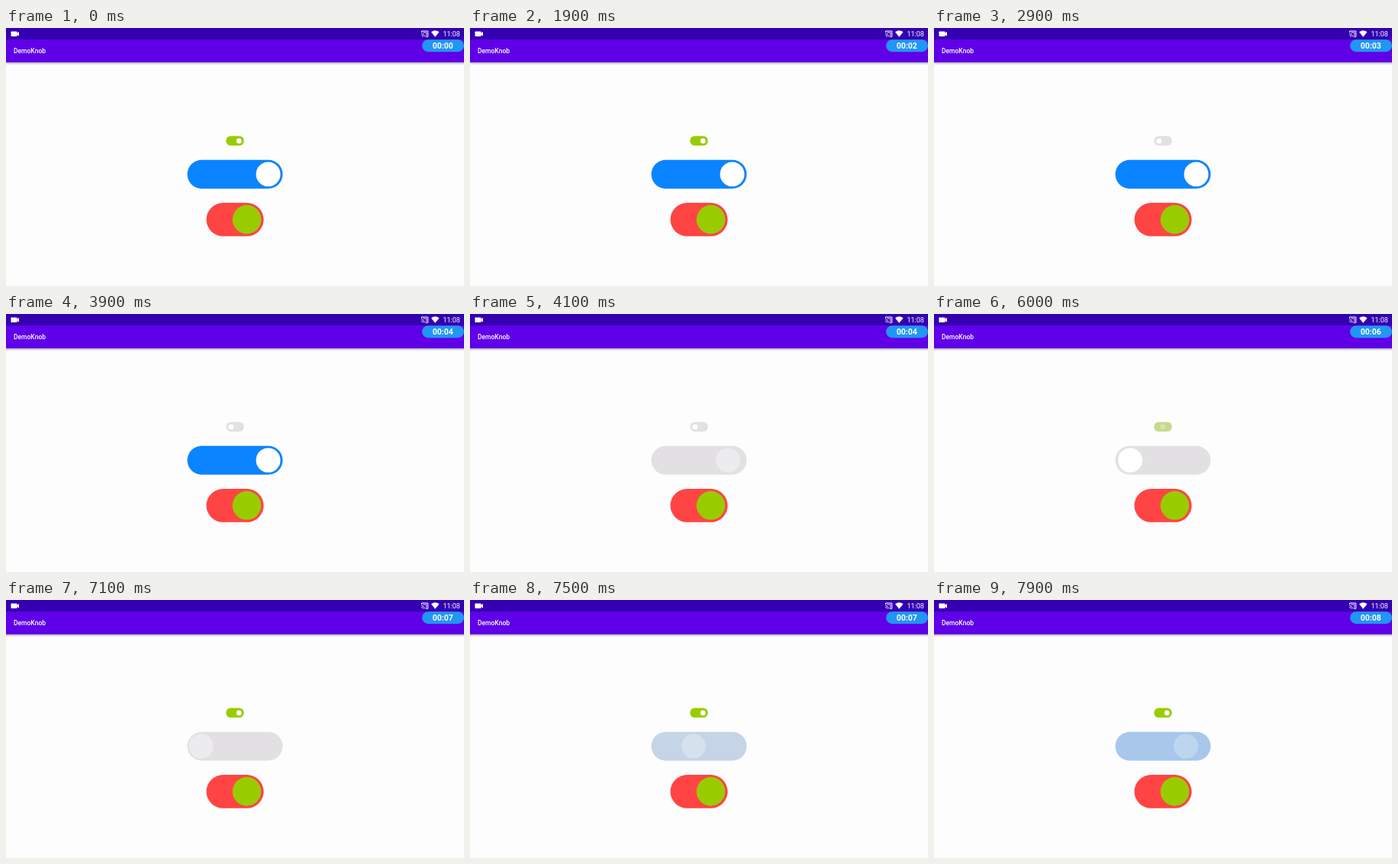
Write an HTML page that moves like this. It is 600 px wide and 338 px high and loops after 8 s.

```html
<!DOCTYPE html>
<html lang="en">
<head>
<meta charset="utf-8">
<title>Toggle buttons</title>
<style>
  html, body { margin: 0; width: 100%; height: 100%; overflow: hidden; background: #fefdfe; }
  svg { display: block; width: 100%; height: 100%; }
  text { font-family: Roboto, sans-serif; fill: #fff; }
</style>
</head>
<body>
<svg viewBox="0 0 600 338" preserveAspectRatio="none">
  <defs>
    <linearGradient id="shade" x2="0" y2="1">
      <stop stop-color="#000" stop-opacity=".28"/>
      <stop offset="1" stop-color="#000" stop-opacity="0"/>
    </linearGradient>
  </defs>
  <rect width="600" height="338" fill="#fefdfe"/>
  <rect y="45" width="600" height="3.5" fill="url(#shade)"/>
  <rect y="14" width="600" height="31" fill="#6000e8"/>
  <rect width="600" height="15" fill="#3400b0"/>

  <g fill="#fff">
    <rect x="6.5" y="4.5" width="8" height="6.5" rx=".8"/>
    <path d="M14 7 17 4.8V10.7L14 8.5Z"/>
    <path d="M557 5.3Q562.2 1.2 567.5 5.3L562.2 11.8Z"/>
  </g>
  <g fill="none" stroke="#fff">
    <path d="M544.5 6V4H552.8V11.3H549.5"/>
    <path d="M544.2 7.3A4 4 0 0 1 548.2 11.4M544.2 9.3A2 2 0 0 1 546.2 11.4" stroke-width=".9"/>
    <path d="M546.3 5.9H551V9.4H549.8" stroke-width=".9"/>
  </g>
  <text x="572.5" y="11" font-size="9">11:08</text>
  <text x="10" y="33.3" font-size="8.5" font-weight="500">DemoKnob</text>

  <rect x="545" y="15.2" width="55" height="16" rx="8" fill="#2196f3"/>
  <text id="clock" x="572.3" y="27.2" font-size="10.5" font-weight="700" text-anchor="middle">00:00</text>

  <g id="small">
    <rect x="288.2" y="141.5" width="23.6" height="12.6" rx="6.3"/>
    <circle cy="147.9" r="3.4" fill="#fff"/>
  </g>
  <g id="wide">
    <rect x="237.5" y="172.8" width="125" height="37.6" rx="18.8"/>
    <circle cy="191.6" r="16" fill="#fff"/>
  </g>
  <rect x="262.5" y="229" width="75" height="43.8" rx="21.9" fill="#ff4444"/>
  <circle cx="315.5" cy="250.9" r="18.8" fill="#99cc00"/>
</svg>
<script>
const LOOP = 8000, STEP = 100;
const GREY = [226, 224, 227], GREEN = [153, 204, 0], BLUE = [10, 132, 255];

const clock = document.getElementById("clock");
const small = document.getElementById("small").children;
const wide = document.getElementById("wide").children;

const mix = (a, b, p) => a + (b - a) * p;
const blend = (a, b, p) => `rgb(${a.map((v, i) => Math.round(mix(v, b[i], p)))})`;

// Linear interpolation through rows of [time, value, ...]; column picks the value.
function at(rows, t, col) {
  let i = rows.length - 1;
  while (i > 0 && rows[i][0] > t) i--;
  const a = rows[i], b = rows[i + 1];
  return b ? mix(a[col], b[col], (t - a[0]) / (b[0] - a[0])) : a[col];
}

// Rows: time, knob x, knob opacity, share of the "on" colour.
const SMALL = [
  [0, 305.2, 1, 1], [2499, 305.2, 1, 1],
  [2500, 304, .35, 0], [2800, 296, .15, 0], [2900, 294.8, 1, 0],
  [5799, 294.8, 1, 0], [5800, 294.8, .35, 0],
  [6200, 304, .25, .75], [6300, 305.2, 1, 1]
];
const WIDE = [
  [0, 343.5, 1, 1], [4099, 343.5, 1, 1],
  [4100, 338, .33, 0], [4200, 338, .33, 0], [4800, 290, .15, 0],
  [4900, 257, 0, 0], [5299, 257, 0, 0], [5300, 257, 1, 0],
  [7099, 257, 1, 0], [7100, 255.6, .33, 0], [7900, 330, .25, .27]
];

function pose([track, knob], rows, color, t) {
  track.setAttribute("fill", blend(GREY, color, at(rows, t, 3)));
  knob.setAttribute("cx", at(rows, t, 1));
  knob.setAttribute("opacity", at(rows, t, 2));
}

function draw(now) {
  const t = Math.floor(now % LOOP / STEP) * STEP;
  clock.textContent = "00:0" + Math.floor((t + 100) / 1000);
  pose(small, SMALL, GREEN, t);
  pose(wide, WIDE, BLUE, t);
}

const start = performance.now();
function tick() {
  draw(performance.now() - start);
  requestAnimationFrame(tick);
}
tick();
</script>
</body>
</html>
```
